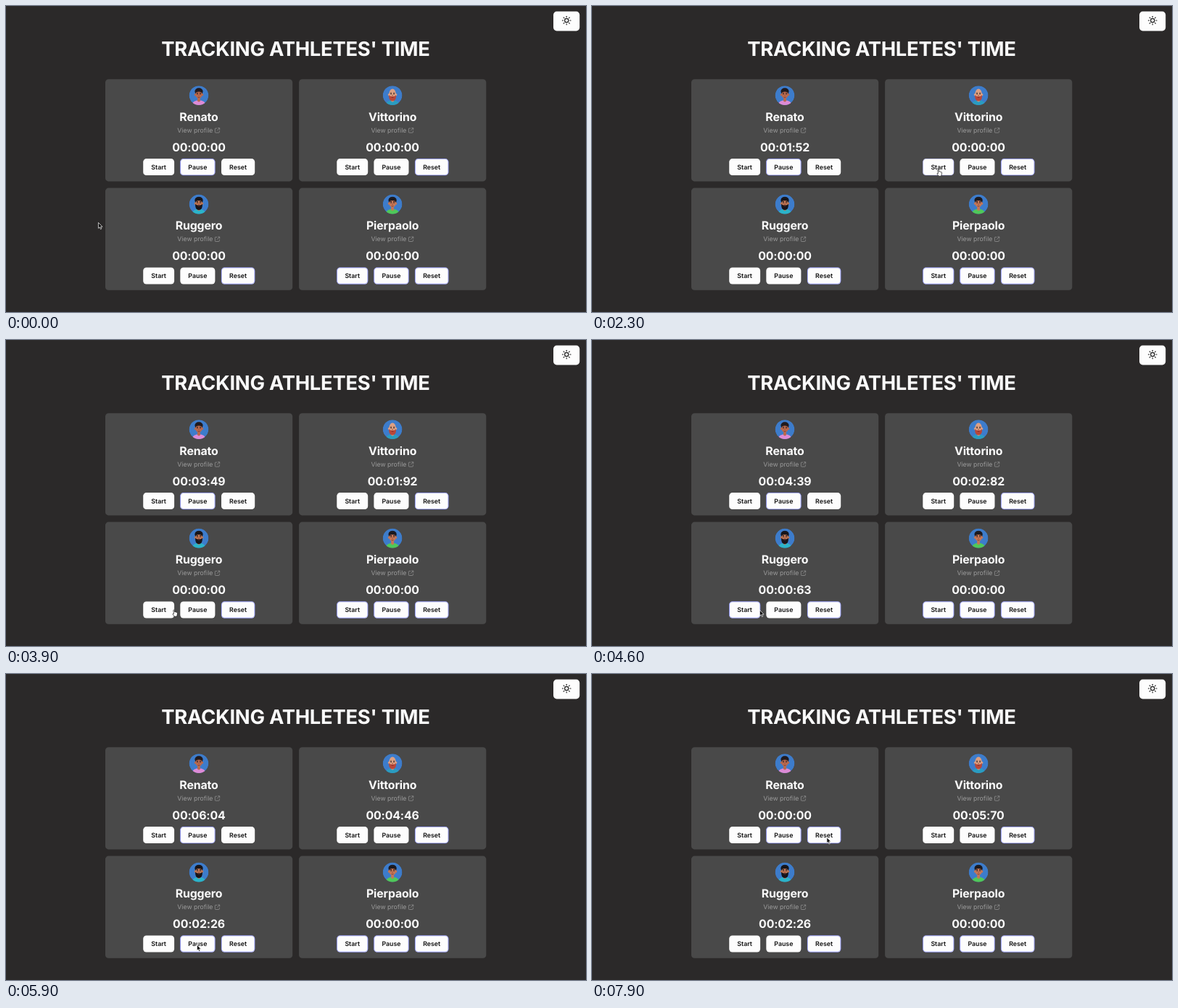
Recreate the animation shown at these times as an HTML page. Size 800 by 423 pixels, loop 8000 ms.

```html
<!DOCTYPE html>
<html lang="en">
<head>
<meta charset="utf-8">
<title>Tracking athletes' time</title>
<style>
  html, body { margin: 0; width: 100%; height: 100%; overflow: hidden; background: #2b2929; }
  svg { display: block; width: 800px; height: 423px; }
  text { font-family: Inter, "Open Sans", sans-serif; text-anchor: middle; text-rendering: geometricPrecision; }
  .title { font-size: 27.4px; font-weight: 700; letter-spacing: -.01em; fill: #fbfbfb; }
  .big { font-size: 15.9px; font-weight: 700; letter-spacing: -.01em; fill: #fbfbfb; }
  .link { font-size: 8.75px; fill: #9b9b9b; text-anchor: start; }
  .label { font-size: 8.8px; font-weight: 600; fill: #111; }
</style>
</head>
<body>
<svg id="stage" viewBox="0 0 800 423" xmlns="http://www.w3.org/2000/svg">
  <defs><clipPath id="disc"><circle r="13.4"/></clipPath></defs>
</svg>
<script>
const LOOP = 8000, STEP = 100, FADE = 200;
const START = 0, PAUSE = 1, RESET = 2;
const stage = document.getElementById('stage');

function add(parent, tag, attrs, text) {
  const el = document.createElementNS('http://www.w3.org/2000/svg', tag);
  for (const k in attrs) el.setAttribute(k, attrs[k]);
  if (text) el.textContent = text;
  parent.appendChild(el);
  return el;
}
const group = (parent, x, y) => add(parent, 'g', { transform: `translate(${x} ${y})` });
const box = (parent, x, y, width, height, rx, fill) =>
  add(parent, 'rect', { x, y, width, height, rx, fill });
const oval = (parent, cx, cy, rx, ry, fill) =>
  add(parent, 'ellipse', { cx, cy, rx, ry, fill });
const path = (parent, d, attrs) => add(parent, 'path', { d, ...attrs });

const athletes = [
  { name: 'Renato', skin: '#b9694d', hair: '#211a1e', shirt: '#dd8bd6' },
  { name: 'Vittorino', skin: '#dda083', shirt: '#2a9cc0', beard: '#b8473a' },
  { name: 'Ruggero', skin: '#bd7654', hair: '#17151a', shirt: '#2bb3c9', beard: '#17151a' },
  { name: 'Pierpaolo', skin: '#c47656', hair: '#1c1a20', shirt: '#4fc85a' }
];

function drawAvatar(parent, a) {
  const g = group(parent, 129, 22.4);
  const p = add(g, 'g', { 'clip-path': 'url(#disc)' });
  oval(p, 0, 0, 13.4, 13.4, '#3d7ccb');
  oval(p, 0, 13, 9.4, 6.4, a.shirt);
  box(p, -2, 3, 4, 6, 2, a.skin);
  if (a.hair) oval(p, 0, -5.5, 5.6, 4.8, a.hair);
  for (const side of [-1, 1]) oval(p, side * 5, -1, 1.2, 1.7, a.skin);
  oval(p, 0, -1.5, 4.8, a.hair ? 5.6 : 7.6, a.skin);
  if (a.hair) path(p, 'M-5-2Q-6-9.5 0-9.5Q6-9.5 5-2Q4-5.2 0-5Q-4-5.2-5-2Z', { fill: a.hair });
  if (a.beard) path(p, 'M-4.9-.5Q-3 2 0 1.3Q3 2 4.9-.5Q5.4 8 0 8Q-5.4 8-4.9-.5Z', { fill: a.beard });
  for (const side of [-1, 1]) {
    oval(p, side * 2, -2, .7, .8, '#17131a');
    box(p, side * 2.1 - 1.2, -3.9, 2.4, .8, .4, '#2a1d1c');
  }
  oval(p, 0, 0, .9, .9, '#a95b45');
  path(p, 'M-1.4 2.4Q0 3.4 1.4 2.4', { stroke: '#6d2d2a', 'stroke-width': .7, fill: 'none' });
}

const buttons = [['Start', 52.2, 42.9], ['Pause', 103.3, 48.1], ['Reset', 160, 46.2]];

function drawCard(a, i) {
  const g = group(stage, 137 + (i % 2) * 267.1, 101.2 + (i >> 1) * 150.4);
  box(g, 0, 0, 258.2, 141.2, 4.4, '#494949');
  drawAvatar(g, a);
  add(g, 'text', { class: 'big', x: 129, y: 57.9 }, a.name);
  add(g, 'text', { class: 'link', x: 99.3, y: 73.8 }, 'View profile');
  path(g, 'M154 67.9H152.1Q151.3 67.9 151.3 68.7V73.1Q151.3 73.9 152.1 73.9H156.5Q157.3 73.9 157.3 73.1V71.2M155.2 67.5H157.7V70M157.5 67.7L154 71.2',
    { fill: 'none', stroke: '#9b9b9b', 'stroke-width': .7 });
  const time = add(g, 'text', { class: 'big', x: 129, y: 99.7 }, '00:00:00');
  const rims = buttons.map(([label, x, w]) => {
    box(g, x, 109.9, w, 23, 4.4, '#fdfdfd');
    add(g, 'text', { class: 'label', x: x + w / 2, y: 124.7 }, label);
    const rim = box(g, x + .3, 110.2, w - .6, 22.4, 4.2, 'none');
    rim.setAttribute('stroke', '#646cff');
    rim.setAttribute('stroke-width', .6);
    return rim;
  });
  return { time, rims };
}

function drawSun() {
  box(stage, 755, 7.6, 36.2, 26.8, 4.6, '#fdfdfd');
  const g = add(stage, 'g', {
    transform: 'translate(773.2 20)', fill: 'none', stroke: '#161616',
    'stroke-width': 1.15, 'stroke-linecap': 'round'
  });
  add(g, 'circle', { r: 2.6 });
  for (let a = 0; a < 360; a += 45) path(g, 'M0-4.7V-5.8', { transform: `rotate(${a})` });
}

add(stage, 'rect', { width: 800, height: 423, fill: '#2b2929' });
add(stage, 'text', { class: 'title', x: 399.5, y: 68.9 }, "TRACKING ATHLETES' TIME");
drawSun();
const cards = athletes.map(drawCard);

const cursor = add(stage, 'g', {});
const ink = { stroke: '#fff', 'stroke-width': .7, 'stroke-linejoin': 'round', fill: '#0c0c0c' };
const arrow = path(cursor, 'M.4.4V8.3L2.2 6.7L3.4 9.5L4.8 8.9L3.6 6.2H6Z', ink);
const hand = path(cursor, 'M-.2.6Q.6-.4 1.3.6L1.7 3Q2.7 2.4 3.1 3.2Q4 2.7 4.4 3.6Q5.4 3.3 5.5 4.4L5.2 7.2L4.5 9.2H1.3L-1.1 6Q-1.2 5 .5 5.4Z',
  { ...ink, fill: '#fff', stroke: '#0c0c0c' });

// The cursor's visits: it sets off at `go`, rests from `at` and presses at `click`.
const home = { x: 127, y: 299 };
const visits = [
  { card: 0, button: START, go: 100, at: 900, click: 1100, x: 216, y: 224 },
  { card: 1, button: START, go: 1500, at: 2200, click: 2340, x: 477, y: 226 },
  { card: 2, button: START, go: 2450, at: 3900, click: 4105, x: 231, y: 373 },
  { card: 2, button: PAUSE, go: 5200, at: 5500, click: 5888, x: 263, y: 374 },
  { card: 1, button: PAUSE, go: 6050, at: 6500, click: 6899, x: 536, y: 230 },
  { card: 0, button: RESET, go: 7050, at: 7700, click: 7800, x: 323.5, y: 225.5 }
];

const clamp = (v, lo, hi) => Math.min(hi, Math.max(lo, v));
const ease = u => 1 - (1 - u) ** 2.5;

// Key points of the recorded clock, which runs at an uneven pace: [ms, hundredths].
const pace = [[1100, 0], [1500, 50.5], [3000, 241.6], [3900, 349.6], [5200, 517.2], [6700, 703.2], [LOOP, 865]];

function clock(t) {
  const i = Math.max(1, pace.findIndex(p => p[0] >= t));
  const [t0, v0] = pace[i - 1], [t1, v1] = pace[i];
  return v0 + (v1 - v0) * (t - t0) / (t1 - t0);
}

function elapsed(card, t) {
  let from = t, to = t;
  for (const v of visits) {
    if (v.card !== card || v.click > t) continue;
    if (v.button === START) from = v.click;
    if (v.button === PAUSE) to = v.click;
    if (v.button === RESET) from = to;
  }
  return clock(to) - clock(from);
}

function format(cs) {
  return [cs / 6000, cs / 100 % 60, cs % 100]
    .map(v => String(Math.floor(v)).padStart(2, '0')).join(':');
}

function render(t) {
  cards.forEach((c, i) => { c.time.textContent = format(elapsed(i, t)); });

  let { x, y } = home, pointing = false;
  visits.forEach((v, i) => {
    const leave = visits[i + 1]?.go ?? LOOP + FADE;
    const glow = clamp(Math.min(t - v.at, leave + FADE - t) / FADE, 0, 1);
    cards[v.card].rims[v.button].setAttribute('opacity', glow);

    const u = ease(clamp((t - v.go) / (v.at - v.go), 0, 1));
    x += (v.x - x) * u;
    y += (v.y - y) * u;
    pointing ||= v.button === START && t >= v.at - FADE && t < v.click;
  });
  cursor.setAttribute('transform', `translate(${x} ${y})`);
  arrow.setAttribute('visibility', pointing ? 'hidden' : 'visible');
  hand.setAttribute('visibility', pointing ? 'visible' : 'hidden');
}

let start;
function tick(now) {
  start ??= now;
  render(Math.floor((now - start) % LOOP / STEP) * STEP);
  requestAnimationFrame(tick);
}
render(0);
requestAnimationFrame(tick);
</script>
</body>
</html>
```
